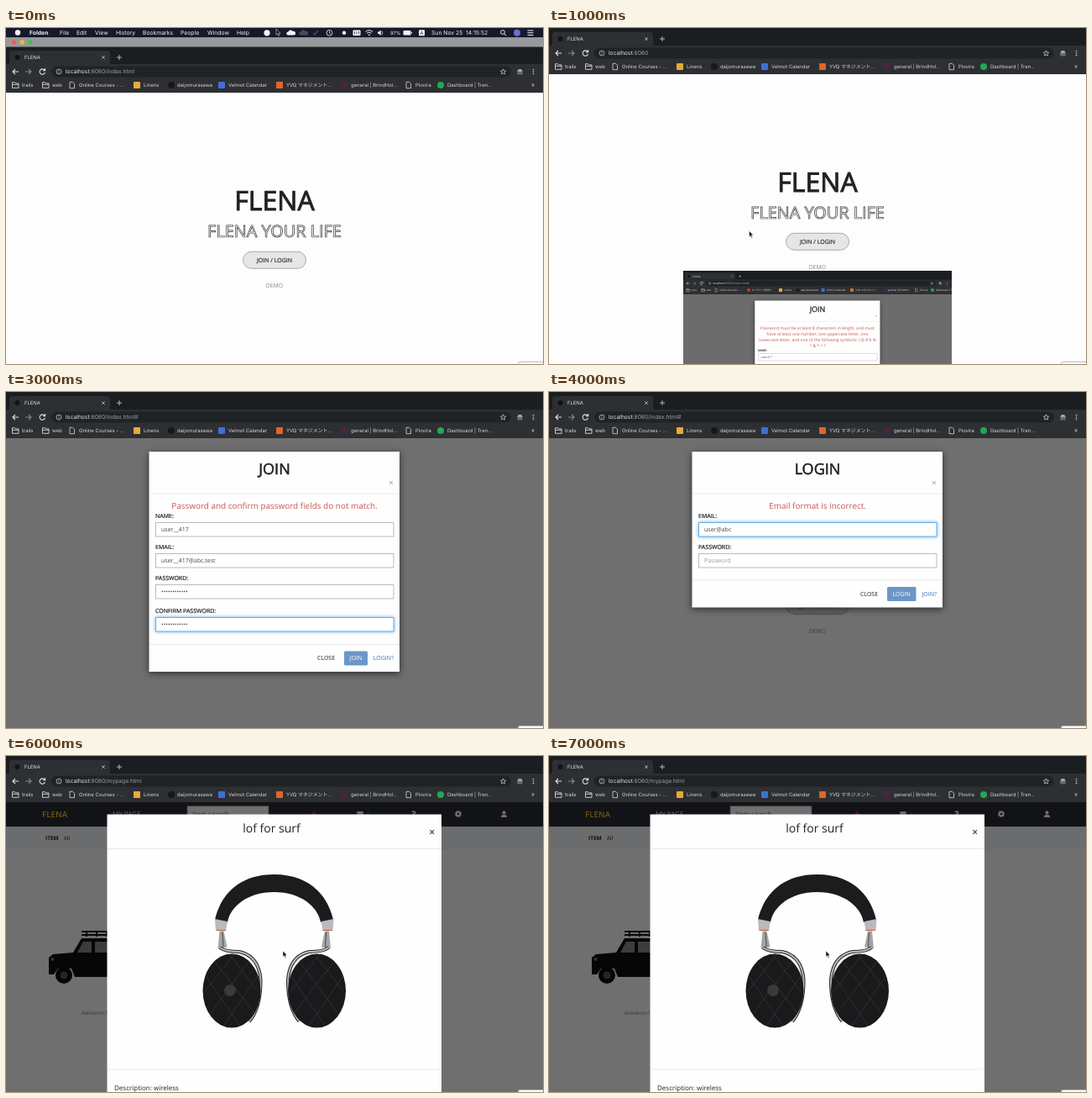
Write an HTML page that moves like this. It is 640x400 px and loops after 8 s.

```html
<!DOCTYPE html>
<html lang="en">
<head>
<meta charset="utf-8">
<title>Browser session</title>
<style>
html, body { margin: 0; width: 100%; height: 100%; overflow: hidden; background: #fdfdfd; }
#stage { display: block; width: 640px; height: 400px; }
text { font-family: "Open Sans", sans-serif; white-space: pre; text-rendering: geometricPrecision; }
.ui text { font-family: Inter, "Noto Sans CJK JP", sans-serif; }
.mid { text-anchor: middle; }
.semi { stroke: currentColor; stroke-width: .03em; }
.shadow { filter: drop-shadow(0 2px 4px #0009); }
.glow { filter: drop-shadow(0 0 2px #66afe9); }
</style>
</head>
<body>
<svg id="stage" viewBox="0 0 640 400"></svg>
<script>
const INK = '#222', SILVER = '#b9babd';
const BRAND = 'FLENA';

const rect = (x, y, w, h, fill, more = '') =>
  `<rect x="${x}" y="${y}" width="${w}" height="${h}" fill="${fill}" ${more}/>`;
const circle = (x, y, r, fill, more = '') =>
  `<circle cx="${x}" cy="${y}" r="${r}" fill="${fill}" ${more}/>`;
const fill = (d, color, more = '') => `<path d="${d}" fill="${color}" ${more}/>`;
const line = (d, color, width = 1, more = '') =>
  `<path d="${d}" fill="none" stroke="${color}" stroke-width="${width}" ${more}/>`;
const text = (x, y, s, size, color = INK, cls = '', more = '') =>
  `<text x="${x}" y="${y}" font-size="${size}" fill="${color}" color="${color}" class="${cls}" ${more}>${s}</text>`;
const at = (x, y, body) => `<g transform="translate(${x} ${y})">${body}</g>`;
const cross = (x, y, r, color, width) =>
  line(`M${x - r} ${y - r}l${2 * r} ${2 * r}m0 ${-2 * r}l${-2 * r} ${2 * r}`, color, width);

const pointer = (x, y) =>
  at(x, y, fill('M0 0V7.2L1.7 5.7L2.9 8.4L4 7.9L2.8 5.3H5Z', '#111', 'stroke="#fff" stroke-width=".5"'));

// Browser window
const folder = x => line(`M${x + .5} 42.7h3l1 1.2h3.5v5.4h-7.5zm0 2.6h7.5`, '#c4c7ca', 1);
const page = x => line(`M${x} 42.3h3.5l2 2v5.4h-5.5z`, '#c4c7ca', .9);
const square = color => x => rect(x, 42, 8, 8, color, 'rx="1"');
const dot = color => x => circle(x + 4, 46, 4, color);

const bookmarks = [
  [7, 19, 'trails', folder], [43, 55, 'web', folder],
  [76, 87, 'Online Courses - ...', page], [152, 164, 'Linens', square('#e8a93a')],
  [193, 204, 'daijomurasawa', dot('#15171a')], [253, 265, 'Velmot Calendar', square('#3f6fd8')],
  [322, 334, 'YVQ マネジメント...', square('#e0662a')], [399, 411, 'general | BrindHol...', square('#4a2440')],
  [477, 488, 'Plovira', page], [514, 526, 'Dashboard | Tren...', dot('#21a953')]
];

function browser(url, extraBookmark) {
  const shift = i => extraBookmark && i > 2 ? 76 : 0;
  const marks = bookmarks.map(([ix, tx, label, icon], i) =>
    at(shift(i), 0, icon(ix) + text(tx, 48.2, label, 5.9, '#d4d6d9'))).join('');
  const [host, path] = url.split('8080');
  const extra = extraBookmark ? dot('#c8372d')(152) + text(163, 48.2, 'オンライン学習サ...', 5.9, '#d4d6d9') : '';
  return `<g class="ui">` +
    rect(0, 0, 640, 55.5, '#1a1e21') +
    fill('M2 21q2 0 2-2V8q0-3 3-3H121q3 0 3 3v11q0 2 2 2z', '#2d2f33') +
    rect(0, 21, 640, 34.3, '#2d2f33') + rect(54, 23.5, 548, 13, '#202326', 'rx="6.5"') +
    circle(13.5, 13, 3, '#111315') + text(22, 15.2, BRAND, 5.9, '#e0e1e3') +
    cross(116, 13, 1.8, '#c4c7ca', .8) + line('M132 13h6m-3-3v6', '#c4c7ca', .9) +
    line('M15 30H8m3-3l-3 3l3 3', '#dfe1e3', 1.1) +
    line('M23 30h7m-3-3l3 3l-3 3', '#85888c', 1.1) +
    line('M46 28.3A3.2 3.2 0 1 0 46.4 31M46.6 26v2.7h-2.7', '#dfe1e3', 1.1) +
    circle(63, 30, 3, 'none', 'stroke="#c4c7ca" stroke-width=".8"') + line('M63 29.6v2M63 28v.8', '#c4c7ca', .8) +
    text(71, 32.4, `${host}<tspan fill="#9aa0a6">8080${path}</tspan>`, 6.7, '#e4e6e8') +
    line('M592.5 26.8l.9 2.2l2.3.2l-1.8 1.5l.6 2.3l-2-1.2l-2 1.2l.6-2.3l-1.8-1.5l2.3-.2z', '#c4c7ca', .8) +
    fill('M610.5 27h4l.6 2.5h1v.8h-7.2v-.8h1z', '#a4a7aa') +
    circle(611, 32, 1.2, 'none', 'stroke="#a4a7aa" stroke-width=".7"') +
    circle(614, 32, 1.2, 'none', 'stroke="#a4a7aa" stroke-width=".7"') +
    [27.5, 30, 32.5].map(y => circle(628.5, y, .8, '#d4d6d9')).join('') +
    marks + extra + (extraBookmark ? '' : text(626, 48.2, '»', 7, '#d4d6d9')) + '</g>';
}

const statusBox = rect(610.5, 397.5, 36, 10, '#fff', 'rx="2" stroke="#aaa" stroke-width=".8"');
const dim = rect(0, 55, 640, 345, '#000', 'opacity=".56"');

function menuBar() {
  const W = '#f4f4f6';
  const menus = [[64, 'File'], [84, 'Edit'], [106, 'View'], [131, 'History'], [163, 'Bookmarks'],
    [208, 'People'], [240, 'Window'], [275, 'Help']];
  const cloud = (x, color) => fill(`M${x} 8.5a2 2 0 0 1 .5-4a3 3 0 0 1 5.5-.5a2.3 2.3 0 0 1 1.5 4.5z`, color);
  return `<g class="ui">` + rect(0, 0, 640, 11.5, '#17182b') + rect(0, 11.5, 640, 11, '#98999c') +
    ['#f15b51', '#f2b73a', '#3fc14a'].map((c, i) => circle(9.5 + i * 9.8, 17, 2.8, c)).join('') +
    circle(14, 5.5, 3.2, W) + text(28, 8.2, 'Folden', 6.8, W, '', 'font-weight="700"') +
    menus.map(([x, s]) => text(x, 8.2, s, 6.8, W)).join('') +
    circle(311, 5.8, 3.6, W) + cloud(336, W) + cloud(351, '#4a4c5e') +
    line('M366 6l2 2l4-5', '#4a4c5e', 1.5) +
    circle(385.5, 5.8, 3.4, 'none', `stroke="${W}" stroke-width=".8"`) + line('M385.5 3.6v2.4l1.6 1', W, .8) +
    circle(403, 5.8, 2.2, W) + rect(413.5, 2.5, 9, 6.5, W, 'rx="1"') + line('M415.5 4v3.5m2.5-3.5v3.5m2.5-3.5v3.5', '#17182b', .7) +
    line('M428.5 4.5q4.3-3.6 8.6 0M430 6.3q2.8-2.3 5.6 0', W, 1) + circle(432.8, 8.3, .9, W) +
    fill('M443 4.5h1.6l2.2-2v6.6l-2.2-2H443z', W) + line('M448 3.5q1.6 2.3 0 4.6', W, .7) +
    text(458, 8, '97%', 5.7, W) +
    rect(473.5, 3, 9, 5.4, W, 'rx="1"') + rect(483, 4.8, 1, 1.8, W) +
    rect(492, 2.2, 7, 7, W, 'rx="1"') + text(495.5, 7.9, 'A', 5.5, '#17182b', 'mid') +
    text(507, 8.2, 'Sun Nov 25  14:15:52', 6.8, W) +
    circle(592, 5, 2.4, 'none', `stroke="${W}" stroke-width=".9"`) + line('M593.8 6.8l2.4 2.4', W, 1) +
    circle(609, 5.7, 4, '#6c6fd0') + line('M621.5 3h7m-7 2.7h7m-7 2.7h7', W, 1) +
    '</g>' + pointer(322, 1);
}

// Landing page
const landing =
  rect(0, 55, 640, 345, '#fdfdfd') +
  text(320, 195, BRAND, 32, INK, 'mid semi') +
  text(320, 227, BRAND + ' YOUR LIFE', 19.9, '#fdfdfd', 'mid', 'stroke="#333" stroke-width=".7"') +
  rect(282.5, 244.3, 75, 20, '#e6e6e6', 'rx="10" stroke="#999" stroke-width=".8"') +
  text(320, 256.8, 'JOIN / LOGIN', 7, '#333', 'mid semi') +
  text(320, 286.6, 'DEMO', 6.9, '#8a8a8a', 'mid');

// Form dialogs
function field(y, label, value, { focus, hint } = {}) {
  const border = focus ? 'stroke="#66afe9" class="glow"' : 'stroke="#bbb"';
  return text(178, y, label, 7, INK, 'semi') +
    rect(178.5, y + 5.5, 283.5, 16.5, '#fff', border) +
    text(185, y + 16.4, value, 7, hint ? '#999' : '#444');
}

function dialog(height, title, errors, fields, action, actionWidth, other) {
  const foot = 71 + height - 32.5;
  return rect(170.5, 71, 298.5, height, '#fefefe', 'class="shadow"') +
    text(320, 98, title, 18, INK, 'mid semi') + cross(459, 108, 2, '#aaa', 1) +
    line('M171 121h298', '#e3e3e3', .8) +
    errors.map((s, i) => text(320, 139 + i * 14, s, 9.95, '#c85750', 'mid')).join('') +
    at(0, errors.length * 14 - 14, fields) +
    line(`M171 ${foot}h298`, '#e3e3e3', .8) +
    text(371, foot + 18.6, 'CLOSE', 7) +
    rect(403, foot + 8, actionWidth, 17, '#6c96c8', 'rx="1.5"') +
    text(403 + actionWidth / 2, foot + 18.6, action, 7, '#fff', 'mid') +
    text(462, foot + 18.6, other, 7, '#3a73b5', '', 'text-anchor="end"');
}

const dots = '•'.repeat(12);
const joinDialog = (errors, name, confirm) => dialog(262 + (errors.length - 1) * 14, 'JOIN', errors,
  field(150, 'NAME:', name) + field(187, 'EMAIL:', name + '@abc.test') + field(224, 'PASSWORD:', dots) +
  field(263, 'CONFIRM PASSWORD:', confirm, { focus: true }) +
  (confirm ? '' : line('M185 272v9.5', '#222', .7)), 'JOIN', 28, 'LOGIN?');

const mismatch = ['Password and confirm password fields do not match.'];
const weak = ['Password must be at least 8 characters in length, and must',
  'have at least one number, one uppercase letter, one',
  'lowercase letter, and one of the following symbols: ! @ # $ %', '^ &amp; * = ?'];

const loginDialog = dialog(185.5, 'LOGIN', ['Email format is incorrect.'],
  field(150, 'EMAIL:', 'user@abc', { focus: true }) + field(187, 'PASSWORD:', 'Password', { hint: true }),
  'LOGIN', 34.5, 'JOIN?');

const demoVideo = `<svg x="160" y="289" width="320" height="111" viewBox="0 0 640 222">` +
  rect(0, 0, 640, 222, '#6c6c6c') + browser('localhost:8080/index.html#', true) +
  joinDialog(weak, 'user417', dots) + '</svg>';

// Item page
const navBar =
  rect(0, 55, 640, 29, '#292c34') + rect(0, 84, 640, 27, '#f5f7f8') +
  text(43, 73, BRAND, 9.8, '#f4c524', '', 'font-weight="600"') + text(127, 72, 'MY PAGE', 8, '#fff') +
  rect(216, 59.7, 97, 19, '#fff', 'stroke="#8d8f93" stroke-width=".8"') + text(222, 72.3, 'Item search', 8, '#555') +
  line('M363.5 69h7m-3.5-3.5v7', '#dc2f3d', 1.7) +
  rect(418, 66, 8, 6.5, '#fff', 'rx="1"') + line('M418 67.5l4 2.8l4-2.8', '#292c34', .7) +
  line('M431 67q2.2 2.4 0 5', '#2f7bd8', 1) +
  text(486, 72.8, '?', 10.5, '#fff', 'mid', 'font-weight="800"') +
  circle(539, 69, 2.3, 'none', 'stroke="#fff" stroke-width="1.9"') +
  circle(539, 69, 3.5, 'none', 'stroke="#fff" stroke-width="1.2" stroke-dasharray="1.375"') +
  circle(593.5, 67.3, 2, '#fff') + fill('M590 73q0-3.5 3.5-3.5t3.5 3.5z', '#fff') +
  text(47, 100, 'ITEM', 6.5, INK, '', 'font-weight="700"') + text(69, 100, 'All', 6.5);

const tools = y => [171, 377.5, 584].map(x => at(x, y,
  fill('M0 8l.7-2.6L4.8 1.3l2 2L2.6 7.4zM5.4.8l1-.9l2 2l-1 .9z', '#1a1a1a') +
  cross(13, 4.3, 2.2, '#1a1a1a', 1.6))).join('');
const caption = (x, y, s) => text(x, y, s, 6.1, '#777', 'mid');

const surfboard = fill('M112 175C124 186 131 213 131 241C131 270 124 293 118 301Q112 307 107 301C101 293 94 270 94 241C94 213 100 186 112 175Z', 'url(#wood)') +
  line('M112.3 177V303', '#453c3e', .5) + circle(112, 211, 3, '#77757a');

const sweets = [[268, 203, '#8a4a30', '#c9542f'], [322, 204, '#2a1a14', '#cf3a24'],
  [295, 219, '#4a4426', '#2f8a96'], [348, 217, '#d9584a', '#efb5a0']];
const sweetsPhoto = rect(247, 164.5, 146.5, 97, 'url(#mint)') +
  sweets.map(([x, y, dome, side]) => rect(x, y, 24, 17, side) +
    fill(`M${x} ${y + 17}q4-12 12-11t12 11z`, dome)).join('');

const truckWheels = x => rect(x - 3, 203, 6, 22, '#d4d4d4', 'rx="2"') + rect(x - 7, 210, 14, 5, '#85878a') +
  [205, 226].map(y => rect(x - 6, y - 5, 11, 11, '#f2f2f2', 'rx="4" stroke="#999" stroke-width=".6"') +
    circle(x, y, 1.8, '#999')).join('');
const boardPhoto = rect(453, 164, 147, 97.5, '#ebebeb') +
  fill('M470 230h112l-10 3h-90z', '#d2d2d2') +
  fill('M466 208Q467 196 480 194.500Q530 200 572 199Q589 201 589 214Q588 226 574 228Q530 230 484 225Q467 221 466 208Z', 'url(#steel)') +
  line('M511 226l25-24', '#161616', 5) + rect(575, 207, 4, 9, '#333') +
  truckWheels(491) + truckWheels(561);

const dropdown = rect(500, 77, 79, 40, '#fff', 'stroke="#ccc" stroke-width=".8"') +
  rect(500.5, 97, 78, 15, '#f3f5f6') + text(512, 91.5, 'SETTINGS', 8) + text(512, 107.6, 'LOGOUT', 8) +
  line('M527.5 100q1.8 0 1.8 1v6q0 1-1.8 1m3.6-8q-1.8 0-1.8 1v6q0 1 1.8 1', '#222', .8);

const items = rect(0, 55, 640, 345, '#fdfdfd') + navBar + tools(151) +
  surfboard + sweetsPhoto + boardPhoto +
  caption(113.5, 326.5, 'surf is surf') + caption(320, 277.6, 'wagashi') + caption(526, 277.6, 'not surf board') +
  tools(397) + dropdown;

const car = fill('M51 240l5-4l24-2l10-17h40v46H82l-4-10H62l-5 7h-6z', '#0e0e10') +
  fill('M85 234l7-13h10v13zM106 221h20v13h-20z', '#85898d') +
  line('M90 213h40m-40-4h40m-34 0v6m12-6v6m12-6v6', '#0e0e10', 1.8) +
  circle(69, 261, 10, '#0a0a0b') + circle(69, 261, 4.5, '#555') +
  circle(55.5, 242, 2, '#777');

// Headphones: one side is drawn, the other is its mirror image
const cup = `<ellipse cx="269" cy="279.5" rx="34.5" ry="44" fill="#1a1a1c"/>`;
const quilt = line('M238 262l40 58M248 244l48 62M266 236l34 44M300 262l-40 58M290 244l-46 62M272 236l-35 44', '#38383b', .7);
const yoke = 'M255 228Q261 233 278 233Q301 238 303.500 266Q304 299 290 316';
const side = fill('M249 194l15 3l-2 11h-12z', SILVER) + line('M251 207.500h11', '#d2622f', 1.2) +
  fill('M254.500 208.500h5l4 19l-11 2z', '#a3a5a9') + line('M258 210l1 17', '#55575b', 1.2) +
  line(yoke, '#2b2c2f', 4) + line(yoke, SILVER, 1.8) + cup + quilt;
const headphones =
  fill('M249 195C254 172 272 141 319.5 141C367 141 385 172 390 195L375 198C372 180 352 162 319.5 162C287 162 267 180 264 198Z', '#1c1c1e') +
  side + `<g transform="translate(639.5 0) scale(-1 1)">${side}</g>` + circle(267, 279, 7, '#3a3a3d');

const itemDialog = rect(120.5, 69.5, 398.5, 340, '#fefefe') +
  text(316.5, 91, 'lof for surf', 14, INK, 'mid') + cross(507.7, 90.5, 2.3, '#444', 1.2) +
  line('M121 110.500h398M121 373h398', '#e3e3e3', .8) + headphones +
  text(129, 397.6, 'Description: wireless', 8);

const itemView = browser('localhost:8080/mypage.html') +
  rect(0, 55, 640, 345, '#fdfdfd') + navBar + car + caption(107, 307.6, 'dolmeron fo') +
  dim + itemDialog + statusBox + pointer(330, 232);

const overLanding = box => browser('localhost:8080/index.html#') + landing + dim + box + statusBox;

const defs = `<defs>
  <linearGradient id="wood" x2="0" y2="1"><stop stop-color="#1c1a1d"/><stop offset=".5" stop-color="#2f282b"/><stop offset="1" stop-color="#171214"/></linearGradient>
  <linearGradient id="mint"><stop stop-color="#d8e8c9"/><stop offset=".5" stop-color="#eaf2da"/><stop offset="1" stop-color="#e4ecd0"/></linearGradient>
  <linearGradient id="steel" x2="0" y2="1"><stop stop-color="#c4c5c8"/><stop offset="1" stop-color="#8b8d91"/></linearGradient>
</defs>`;

const scenes = [
  at(0, 22, browser('localhost:8080/index.html') + landing) + menuBar() + statusBox,
  browser('localhost:8080') + landing + demoVideo + statusBox + pointer(238.5, 241.5),
  overLanding(joinDialog(mismatch, 'user__417', '')),
  overLanding(joinDialog(mismatch, 'user__417', dots)),
  overLanding(loginDialog),
  browser('localhost:8080/mypage.html') + items + statusBox,
  itemView,
  itemView
];

const stage = document.getElementById('stage');
stage.innerHTML = defs + scenes.map(s => `<g class="scene" display="none">${s}</g>`).join('');
const layers = [...stage.querySelectorAll('.scene')];

function tick() {
  const now = Math.floor(performance.now() / 1000) % scenes.length;
  layers.forEach((g, i) => g.setAttribute('display', i === now ? 'inline' : 'none'));
  requestAnimationFrame(tick);
}
tick();
</script>
</body>
</html>
```
